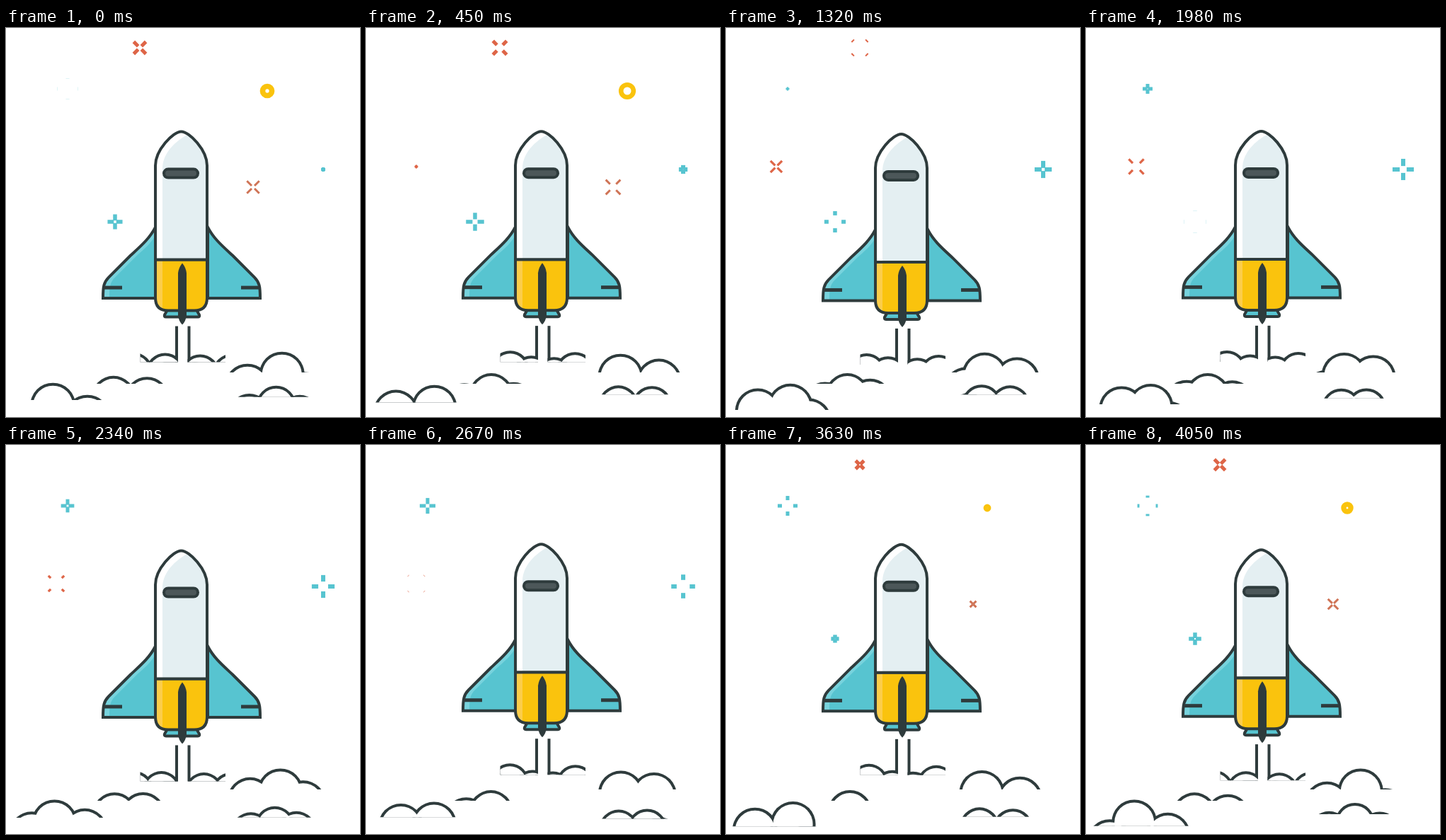
Write an HTML page with a canvas that moves like this. It is 500 by 550 pixels and loops after 4080 ms.

```html
<!DOCTYPE html>
<html lang="en">
<head>
<meta charset="utf-8">
<title>Rocket launch</title>
<style>
  html, body { margin: 0; width: 100%; height: 100%; overflow: hidden; background: #fff; }
  canvas { display: block; }
</style>
</head>
<body>
<canvas id="stage" width="500" height="550"></canvas>
<script>
const ctx = document.getElementById('stage').getContext('2d');
const LOOP = 4080;
const STAR_CYCLE = 4330; // a little longer than the loop, so stars jump when it restarts
const TAU = Math.PI * 2, RAD = Math.PI / 180;
const INK = '#2e3b3c', TEAL = '#57c4d0', RED = '#de6547', YELLOW = '#fac30d';

// Cosine swing that peaks at the given time
const swing = (t, period, peak, size) => size * Math.cos(TAU * (t - peak) / period);
const bob = t => 1.5 + swing(t, 1000, 1220, 5.5);

// Each cloud is a wheel of five puffs, turning once per loop and cut off below
const clouds = [
  { x: 75.5, y: 560, rx: 42, ry: 27, r: 30, turn: -12.6, cut: 533, cutMove: t => swing(t, 2520, 1290, 7) },
  { x: 380.5, y: 516, rx: 42, ry: 27, r: 30, turn: -12.6, cut: 487, flip: true },
  { x: 174, y: 537, rx: 36, ry: 18, r: 29, turn: -38, cut: 503 },
  { x: 379, y: 549, rx: 36, ry: 14, r: 26, turn: -4, cut: 523, flip: true, move: t => swing(t, LOOP, 2920, 6) },
  { x: 201, y: 491, rx: 34, ry: 10, r: 25, turn: -38, cut: 470, move: bob, from: 189.5, to: 243 },
  { x: 298, y: 493, rx: 34, ry: 10, r: 25, turn: -38, cut: 470, move: bob, from: 256.5, to: 310, flip: true }
];

const stars = [
  { kind: 'cross', x: 189, y: 28, size: 15, w: 5, color: RED, start: 2700, life: 3150 },
  { kind: 'plus', x: 87, y: 86, size: 14.5, w: 5, color: TEAL, start: 1200, life: 3150 },
  { kind: 'ring', x: 369, y: 89, size: 13, color: YELLOW, start: 3130, life: 2400 },
  { kind: 'cross', x: 71, y: 196, size: 16, w: 3.2, color: RED, start: 300, life: 2400 },
  { kind: 'cross', x: 349, y: 225, size: 16, w: 3, color: '#cf7355', start: 3150, life: 2500 },
  { kind: 'plus', x: 154, y: 274, size: 15.5, w: 5.5, color: TEAL, start: 3050, life: 3280 },
  { kind: 'plus', x: 448, y: 200, size: 17.5, w: 6, color: TEAL, start: -200, life: 3800 }
];

// Arms shoot out from the centre, then their inner ends follow
function drawStar(s, t) {
  const age = ((t - s.start) % STAR_CYCLE + STAR_CYCLE) % STAR_CYCLE;
  const p = age / s.life;
  if (p >= 1) return;
  const far = s.size * (1 - (1 - p) ** 2.3);
  const near = s.size * p ** 2.3;
  ctx.save();
  ctx.translate(s.x, s.y);
  ctx.fillStyle = s.color;
  if (s.kind === 'ring') {
    ctx.beginPath();
    ctx.arc(0, 0, far, 0, TAU);
    ctx.arc(0, 0, near, 0, TAU);
    ctx.fill('evenodd');
  } else {
    if (s.kind === 'cross') ctx.rotate(Math.PI / 4);
    for (let i = 0; i < 4; i++) {
      ctx.fillRect(near, -s.w / 2, far - near, s.w);
      ctx.rotate(Math.PI / 2);
    }
  }
  ctx.restore();
}

function drawCloud(c, t) {
  const dy = c.move ? c.move(t) : 0;
  const cut = c.cut + dy + (c.cutMove ? c.cutMove(t) : 0);
  const side = c.flip ? -1 : 1;
  const from = c.from ?? 0, to = c.to ?? 500;
  const puffs = [];
  for (let k = 0; k < 5; k++) {
    const uneven = 11 * Math.sin(72 * k * RAD);
    const a = (72 * k + uneven + c.turn - 360 * t / LOOP) * RAD;
    puffs.push([c.x + side * c.rx * Math.sin(a), c.y + dy - c.ry * Math.cos(a)]);
  }
  const discs = (radius, color) => {
    ctx.fillStyle = color;
    for (const [x, y] of puffs) {
      ctx.beginPath();
      ctx.arc(x, y, radius, 0, TAU);
      ctx.fill();
    }
  };
  ctx.save();
  ctx.beginPath();
  ctx.rect(from, 400, to - from, cut - 400);
  ctx.clip();
  discs(c.r + 2, INK);
  discs(c.r - 2, '#fff');
  ctx.restore();
}

function drawJet(t) {
  ctx.fillStyle = INK;
  for (const x of [239, 256.5]) ctx.fillRect(x, 419 + bob(t), 4, 51);
}

const shape = {
  nozzle: new Path2D('M228 396L224 403Q223 406 226 406H271Q274 406 273 403L269 396Z'),
  wing: new Path2D('M211 279C203 295 190 306 176 319L145 350C138 357 137 363 137 379.5H211Z'),
  wingLight: new Path2D('M211 279L211 291C203 304 195 310 185 319L154 350C147 357 146 363 146 379H137V340Z'),
  wingLine: new Path2D('M137 364.5H164'),
  hull: new Path2D('M211 325V192C211 170 236 144 247.5 144C259 144 284 170 284 192V325Z'),
  hullShade: new Path2D('M221 325V196C221 178 234 161 255 149L290 170V325Z'),
  tank: new Path2D('M211 325H284V379Q284 397 266 397H229Q211 397 211 379Z'),
  tankLight: new Path2D('M211 325H221V397H211Z'),
  fin: new Path2D('M249 330Q254 336 255 344V404Q254 412 249 417Q244 412 243 404V344Q244 336 249 330Z')
};

function paint(path, fill, light, lightColor) {
  ctx.fillStyle = fill;
  ctx.fill(path);
  if (light) {
    ctx.save();
    ctx.clip(path);
    ctx.fillStyle = lightColor;
    ctx.fill(light);
    ctx.restore();
  }
  ctx.stroke(path);
}

function pill(x, y, w, h, color) {
  ctx.fillStyle = color;
  ctx.beginPath();
  ctx.roundRect(x, y, w, h, h / 2);
  ctx.fill();
}

function drawRocket(t) {
  ctx.save();
  ctx.translate(0, bob(t));
  ctx.strokeStyle = INK;
  ctx.lineWidth = 4;
  paint(shape.nozzle, TEAL);
  for (const flip of [false, true]) {
    ctx.save();
    if (flip) ctx.transform(-1, 0, 0, 1, 496, 0);
    paint(shape.wing, TEAL, flip ? null : shape.wingLight, '#78d3dd');
    ctx.lineWidth = 5;
    ctx.stroke(shape.wingLine);
    ctx.restore();
  }
  paint(shape.tank, YELLOW, shape.tankLight, '#fccd4a');
  paint(shape.hull, '#fff', shape.hullShade, '#e4eff2');
  pill(221, 195, 52, 16, INK);
  pill(225, 199, 44, 8, '#4c5759');
  ctx.fillStyle = INK;
  ctx.fill(shape.fin);
  ctx.restore();
}

const began = performance.now();
function draw() {
  const t = (performance.now() - began) % LOOP;
  ctx.fillStyle = '#fff';
  ctx.fillRect(0, 0, 500, 550);
  for (const s of stars) drawStar(s, t);
  drawJet(t);
  for (const c of clouds) drawCloud(c, t);
  drawRocket(t);
  requestAnimationFrame(draw);
}
draw();
</script>
</body>
</html>
```
